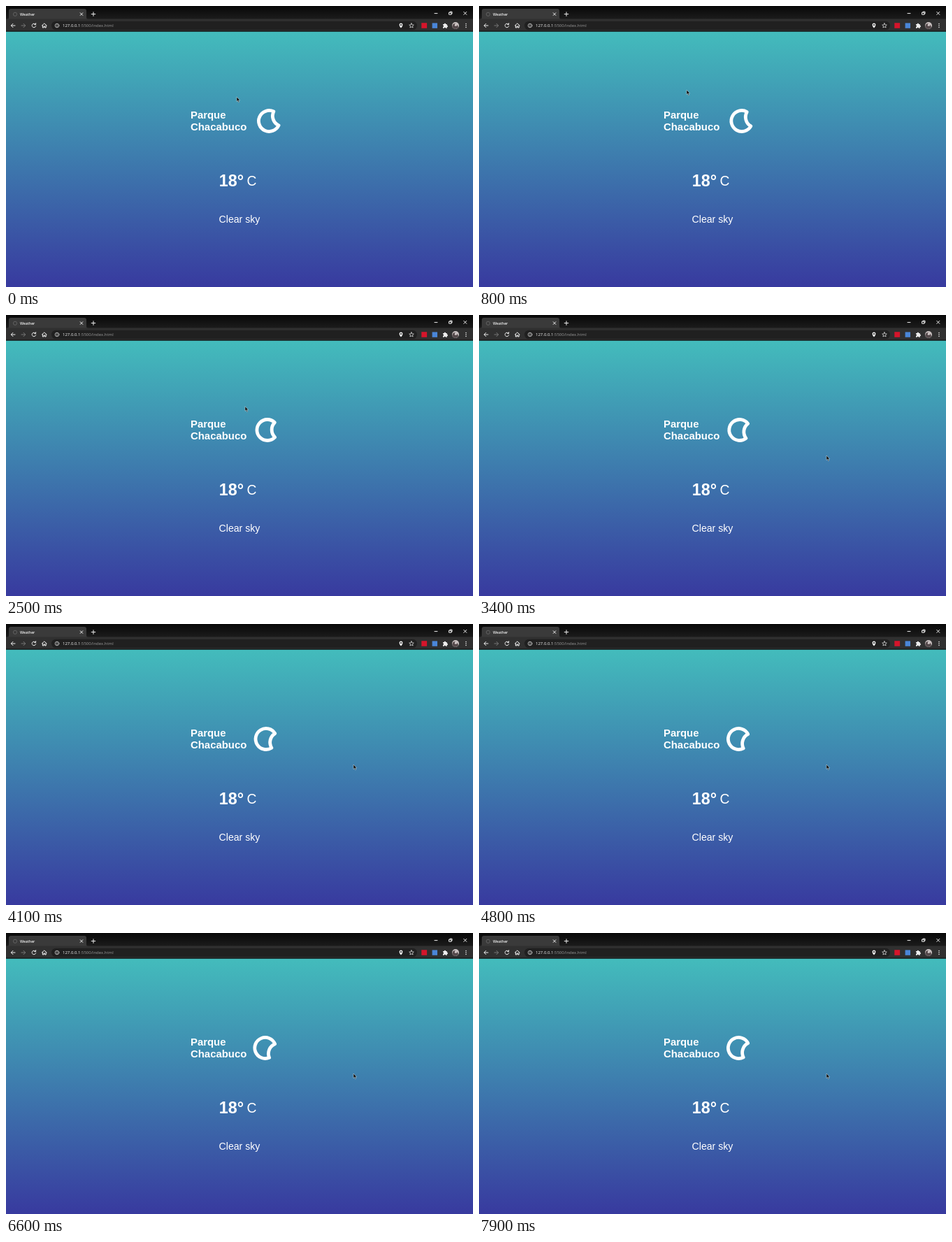
Animation, 668 px wide and 402 px high, one loop 8000 ms. Source, as an HTML page:

```html
<!DOCTYPE html>
<html lang="en">
<head>
<meta charset="utf-8">
<title>Weather</title>
<style>
  html, body { margin: 0; width: 100%; height: 100%; overflow: hidden; background: #383a9f; }
  svg { display: block; width: 668px; height: 402px; }
  .ui { font-family: "Open Sans", "Noto Sans", sans-serif; }
  .page { font-family: "Liberation Sans", Arial, sans-serif; fill: #fff; }
  .bold { font-weight: 700; }
  .line { fill: none; stroke: #eee; stroke-width: 1; stroke-linecap: round; stroke-linejoin: round; }
  .solid { fill: #eee; }
</style>
</head>
<body>
<svg viewBox="0 0 668 402">
  <defs>
    <linearGradient id="sky" x1="0" y1="0" x2="0" y2="1">
      <stop offset="0" stop-color="#43bcbc"/>
      <stop offset="1" stop-color="#383a9f"/>
    </linearGradient>
    <linearGradient id="strip" x1="0" y1="0" x2="0" y2="1">
      <stop offset="0" stop-color="#080808"/>
      <stop offset="1" stop-color="#1c1c1c"/>
    </linearGradient>
  </defs>

  <rect y="36" width="668" height="366" fill="url(#sky)"/>

  <!-- tab strip -->
  <rect width="668" height="19" fill="url(#strip)"/>
  <path d="M1 19Q4 19 4 16V7Q4 4 7 4H112Q115 4 115 7V16Q115 19 118 19Z" fill="#3a3a3a"/>
  <circle cx="13" cy="11.8" r="2.6" fill="none" stroke="#666" stroke-width=".9"/>
  <text class="ui" x="20" y="13.7" font-size="5.2" font-weight="600" fill="#f2f2f2">Weather</text>
  <path class="line" d="M106.2 9.8l3.6 3.6m0-3.6l-3.6 3.6M122.2 11.6h5.6m-2.8-2.8v5.6"/>
  <path class="line" stroke-width=".8" d="M613 10.6h4M634 9.2h3v3h-3zM635 9.2v-1h3v3h-1M654.8 8.4l4 4m0-4l-4 4"/>

  <!-- toolbar -->
  <rect y="18.5" width="668" height="17.5" fill="#303030"/>
  <rect x="65" y="21.7" width="523" height="12.6" rx="6.3" fill="#202020"/>
  <rect y="35.4" width="668" height="1.4" fill="#151a1a"/>
  <path class="line" d="M13 28H7.4m2.6-2.7L7.3 28l2.7 2.7"/>
  <path class="line" style="stroke:#777" d="M22 28h5.6M25 25.3l2.7 2.7-2.7 2.7"/>
  <path class="line" d="M42.2 26.2A2.8 2.8 0 1 0 42.7 28.7M42.6 24.7v1.9h-1.9"/>
  <path class="line" d="M51.4 28l3.4-3.1 3.4 3.1M52.4 27.6v3.4h1.6v-2h1.6v2h1.6v-3.4"/>
  <circle class="line" style="stroke-width:.7" cx="73" cy="28" r="2.8"/>
  <path class="line" style="stroke-width:.8" d="M73 27.9v1.5M73 26.5v.1"/>
  <text class="ui" x="81" y="30.2" font-size="6" fill="#f4f4f4">127.0.0.1<tspan fill="#999">:5500/index.html</tspan></text>

  <path class="solid" fill-rule="evenodd" d="M565 31.6C561.4 27.6 562.3 24.4 565 24.4S568.6 27.6 565 31.6ZM565 26a1 1 0 1 0 .01 0Z"/>
  <path class="line" style="stroke-width:.7" d="M580 24.7l1 2.2 2.3.2-1.8 1.6.6 2.3-2.1-1.2-2.1 1.2.6-2.3-1.8-1.6 2.3-.2z"/>
  <rect x="594.3" y="24.2" width="7.8" height="7.6" fill="#d5152b"/>
  <rect x="609.6" y="24.4" width="7.4" height="7.4" fill="#4a86d8"/>
  <path class="solid" d="M625 26h1.7a1.2 1.2 0 0 1 2.4 0h1.7v1.7a1.2 1.2 0 0 1 0 2.4v1.7h-1.9a1.1 1.1 0 0 0-2.2 0H625v-2a1.1 1.1 0 0 0 0-2.2z"/>
  <circle cx="643" cy="28" r="5" fill="#c9c1c1"/>
  <path d="M638.3 29.6Q639 24 643 25.5T647 31.2L643 33Q639.4 32.6 638.3 29.6Z" fill="#554a4c"/>
  <circle cx="643.4" cy="27.2" r="1.6" fill="#d6cccc"/>
  <g class="solid">
    <circle cx="658" cy="25.5" r=".8"/>
    <circle cx="658" cy="28" r=".8"/>
    <circle cx="658" cy="30.5" r=".8"/>
  </g>

  <!-- weather -->
  <g class="page">
    <text class="bold" font-size="14.9">
      <tspan x="264" y="160.7">Parque</tspan>
      <tspan x="264" y="177.8">Chacabuco</tspan>
    </text>
    <text class="bold" x="304.8" y="258.2" font-size="23.3">18°</text>
    <text x="344.4" y="257.4" font-size="19.3">C</text>
    <text x="304.6" y="310" font-size="14.1">Clear sky</text>
  </g>
  <path id="moon" d="M10.6 10.6A15 15 0 1 1 10.6-10.6A15 15 0 0 0 10.6 10.6Z"
        fill="none" stroke="#fff" stroke-width="4.8" stroke-linejoin="round"/>
  <path id="pointer" d="M0 0V6.6L1.5 5.3 2.6 7.9 3.7 7.4 2.6 4.9H4.7Z"
        fill="#080808" stroke="#d8e4e8" stroke-width=".5" stroke-linejoin="round"/>
</svg>
<script>
  const LOOP = 8000, STEP = 100, SWAY = 15000, CREST = -1150;
  const moon = document.getElementById("moon");
  const pointer = document.getElementById("pointer");

  // time, x, y
  const path = [
    [0, 330, 130], [800, 297, 120], [1600, 219, 75],
    [1900, 219, 75], [3200, 497, 201], [LOOP, 497, 201]
  ];

  function pointerAt(t) {
    const i = path.findIndex(p => p[0] > t);
    const [t0, x0, y0] = path[i - 1], [t1, x1, y1] = path[i];
    const u = (t - t0) / (t1 - t0), k = u * u * (3 - 2 * u);
    return [x0 + (x1 - x0) * k, y0 + (y1 - y0) * k];
  }

  function draw() {
    const t = Math.floor(performance.now() % LOOP / STEP) * STEP;
    const c = Math.cos((t - CREST) / SWAY * 2 * Math.PI);
    moon.setAttribute("transform", `translate(${373.8 + 3 * c} 164.5) rotate(${-22.5 * c})`);
    pointer.setAttribute("transform", `translate(${pointerAt(t)})`);
    requestAnimationFrame(draw);
  }
  draw();
</script>
</body>
</html>
```
